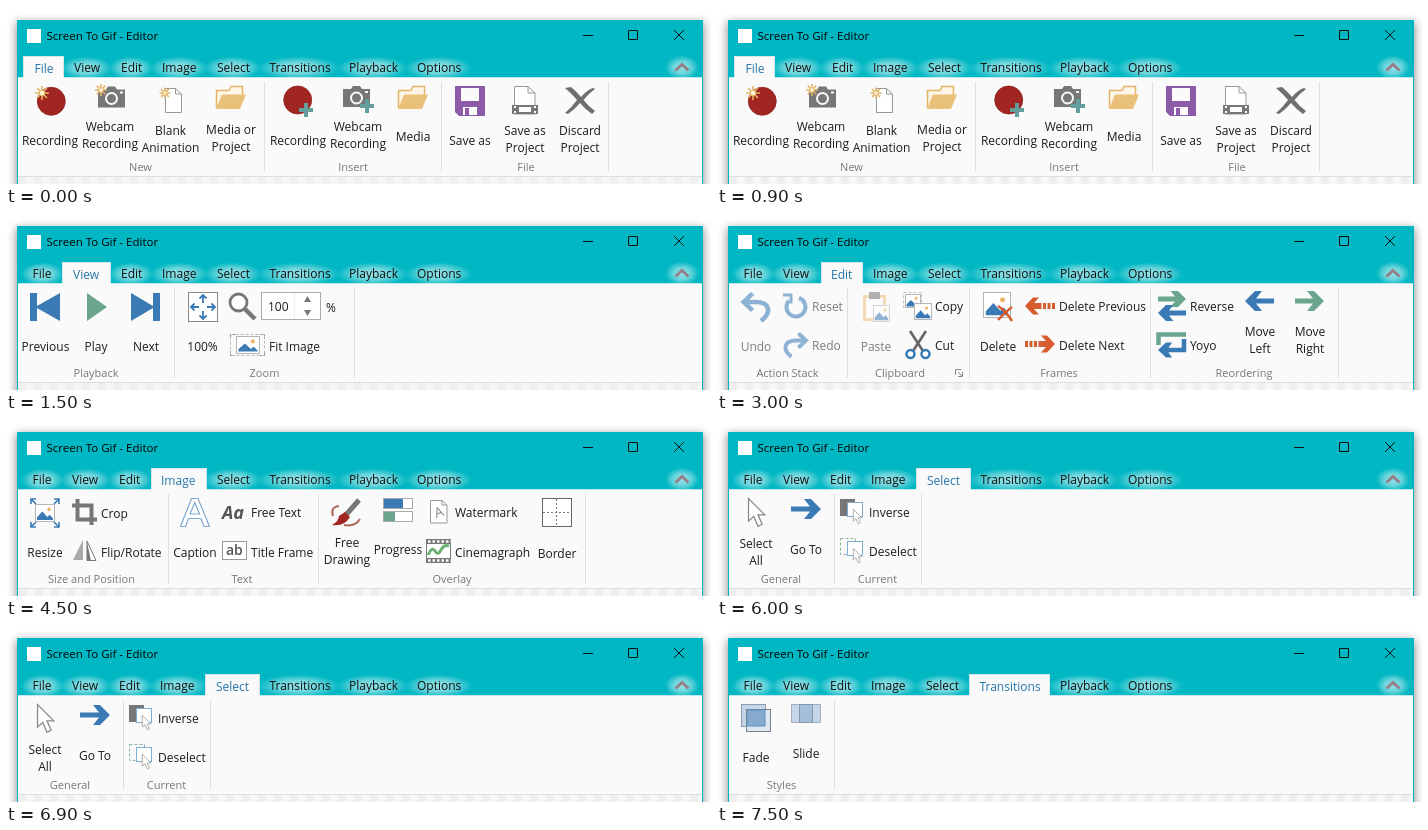
Recreate the animation shown at these times as an HTML page. Size 705 by 178 pixels, loop 8 s.

```html
<!DOCTYPE html>
<html lang="en">
<head>
<meta charset="utf-8">
<title>Ribbon tabs</title>
<style>
html, body { margin: 0; width: 100%; height: 100%; overflow: hidden; background: #fff; }
svg { display: block; width: 705px; height: 178px; font: 12px "Open Sans", sans-serif; }
text { white-space: pre; }
</style>
</head>
<body>
<svg id="stage" viewBox="0 0 705 178" xmlns="http://www.w3.org/2000/svg">
  <defs>
    <filter id="shade" x="-10%" y="-20%" width="120%" height="140%"><feGaussianBlur stdDeviation="5"/></filter>
    <radialGradient id="glow">
      <stop offset="0" stop-color="#fff" stop-opacity=".58"/>
      <stop offset=".5" stop-color="#fff" stop-opacity=".42"/>
      <stop offset="1" stop-color="#fff" stop-opacity="0"/>
    </radialGradient>
    <pattern id="check" x="12" y="171" width="16" height="16" patternUnits="userSpaceOnUse">
      <path d="M0 0h16v16H0z" fill="#f7f7f7"/>
      <path d="M0 0h8v8H0zM8 8h8v8H8z" fill="#efefef"/>
    </pattern>
  </defs>
  <rect x="10" y="16" width="688" height="190" fill="#000" opacity=".42" filter="url(#shade)"/>
  <path d="M11 14H697V178H11z" fill="#00b7c3"/>
  <path d="M12 71H696V178H12z" fill="#fafafa"/>
  <path d="M12 71.500H696" stroke="#c4e8eb"/>
  <path d="M12 170H696V178H12z" fill="url(#check)"/>
  <path d="M12 170.500H696" stroke="#dedede"/>
  <rect x="21" y="23" width="14" height="14" fill="#fff"/>
  <text x="40.500" y="34" font-size="11.500" fill="#000">Screen To Gif - Editor</text>
  <path d="M577 29.500h10M622.500 24.500h9v9h-9zM668 24l10 10M678 24l-10 10" fill="none" stroke="#111"/>
  <ellipse cx="676" cy="61.500" rx="17" ry="12" fill="url(#glow)"/>
  <path d="M669.500 64.500l6.500-6 6.500 6" fill="none" stroke="#967f88" stroke-width="2.800"/>
  <g id="tabs"></g>
  <g id="panel"></g>
</svg>
<script>
const BLUE = '#3a7ab5', GREEN = '#6ca58e', GRAY = '#777', RED = '#a12622',
      ORANGE = '#d65c2e', SAND = '#eac17b', PURPLE = '#8c5ba8', FADED = '#8db2d3';

const fill = (d, color) => `<path d="${d}" fill="${color}"/>`;
const line = (d, color, w = 1, inner = 'none', dash = 'none') =>
  `<path d="${d}" fill="${inner}" stroke="${color}" stroke-width="${w}" stroke-dasharray="${dash}"/>`;
const box = (x, y, w, h, inner, color = 'none') =>
  `<rect x="${x}" y="${y}" width="${w}" height="${h}" fill="${inner}" stroke="${color}"/>`;
const dot = (x, y, r, inner, color = 'none', w = 1) =>
  `<circle cx="${x}" cy="${y}" r="${r}" fill="${inner}" stroke="${color}" stroke-width="${w}"/>`;
const dashes = (x, y, w, h, color) => line(`M${x} ${y}h${w}v${h}h${-w}z`, color, 1, 'none', '3 2');
const at = (x, y, art, extra = '') => `<g transform="translate(${x} ${y}) ${extra}">${art}</g>`;
const fade = art => `<g opacity=".55">${art}</g>`;

// Labels are placed by the middle of their letters
const text = (x, y, s, attrs = '') => `<text x="${x}" y="${y + 5}" ${attrs}>${s}</text>`;
const center = 'text-anchor="middle"', dim = 'fill="#7d7d7d"';
const mid = (x, y, a, b) => b
  ? text(x, y - 1, a, center) + text(x, y + 16, b, center)
  : text(x, y, a, center);
const group = (x, s) => text(x, 160, s, center + ' font-size="11" fill="#777"');
const rules = (...xs) => xs.map(x => line(`M${x + .5} 76V166`, '#dfdfdf')).join('');

// Icon parts
const burst = (x, y, r) => {
  let d = '';
  for (let i = 0; i < 8; i++) {
    const a = i * Math.PI / 4, c = Math.cos(a), s = Math.sin(a);
    d += `M${x + c * r * .4} ${y + s * r * .4}L${x + c * r} ${y + s * r}`;
  }
  return line(d, '#e3b467', 1.6) + dot(x, y, r * .4, '#fff3d2', '#e3b467');
};
const plus = (x, y) => fill(`M${x - 2} ${y - 7}h4v5h5v4h-5v5h-4v-5h-5v-4h5z`, '#629f9c');
const record = (x, y) => dot(x, y, 14, RED, '#8c2422', .8);
const camera = (x, y) => at(x, y,
  fill('M0 3H8L10 0H17L19 3H27V21H0z', GRAY) + dot(13.5, 12, 5.5, GRAY, '#fafafa', 2) +
  box(22, 5, 3, 2, '#fafafa'));
const folder = (x, y) => at(x, y,
  line('M1.500 23V5.500H14L16 1.500H27.500V10', '#e2b568', 1.5, '#fdf6e8') + fill('M1 24L7 9.500H31L25 24z', SAND));
const page = (x, y, w, h, f = 6) => at(x, y,
  line(`M.5 .5H${w - f}L${w} ${f}V${h}H.5zM${w - f} .5V${f}H${w}`, '#999', 1, '#fff'));
const photo = (x, y, w, h) => {
  const m = w * .1, b = h - m;
  return at(x, y, box(.5, .5, w - 1, h - 1, '#fff', '#b5b5b5') +
    fill(`M${m} ${b}V${h * .74}L${w * .37} ${h * .42} ${w * .62} ${h * .72} ${w * .74} ${h * .6} ${w - m} ${h * .8}V${b}z`, BLUE) +
    dot(w * .7, h * .3, w * .09, '#efb66b'));
};
const arrow = (x, y, color, dir = 1, w = 29, h = 10) => at(x, y,
  fill(`M0-2.500H${w - 11}L${w - 9 - h * .8} ${-h}H${w - h}L${w} 0 ${w - h} ${h}H${w - 9 - h * .8}L${w - 11} 2.500H0z`, color),
  `scale(${dir} 1)`);
const cutArrow = (x, y, dir) => at(x, y,
  fill('M0-3h3v6H0zM4.500-3h3v6h-3zM9-3h3v6H9zM13.500-3H21L16-8.500H22L30 0 22 8.500H16L21 3H13.500z', ORANGE),
  `scale(${dir} 1)`);
const pointer = (x, y, s) => at(x, y,
  line('M.5 .5V22L5.500 17.500 9.500 27 13.500 25 9.500 16H16z', '#888', 1.2, '#fff'), `scale(${s})`);
const turn = (x, y, sx, sy) => at(x, y,
  line('M4 10H15C28 10 31 20 20 29', FADED, 4.5) + line('M12 1.500L3.500 10 12 18.500', FADED, 4.5),
  `scale(${sx} ${sy})`);

const panels = [
  () => record(45.3, 95.3) + burst(36, 87, 7) + camera(92, 80.5) + burst(95, 84, 6) +
    page(159, 82, 16.5, 24.5) + burst(159, 87, 5.5) + folder(209, 79) +
    mid(44, 134, 'Recording') + mid(104, 121, 'Webcam', 'Recording') +
    mid(164.5, 125, 'Blank', 'Animation') + mid(225, 124, 'Media or', 'Project') +
    record(291.7, 94) + plus(300, 104) + camera(337, 80) + plus(361, 100) + folder(391, 79) +
    mid(292, 134, 'Recording') + mid(352, 121, 'Webcam', 'Recording') + mid(407, 130, 'Media') +
    at(449, 80, fill('M0 0H30V30H4L0 26z', PURPLE) + box(6, 2, 18, 13, '#fafafa') +
      box(8, 21, 14, 8, '#fafafa') + box(10, 22, 4, 7, PURPLE)) +
    page(508, 80, 21, 28, 7) +
    at(506, 99, box(0, 0, 26, 9, GRAY) + box(7, 2, 12, 5, '#fff') +
      fill('M2 1h2v2H2zM2 6h2v2H2zM22 1h2v2h-2zM22 6h2v2h-2z', '#fff')) +
    fill('M559 82L565 81Q571 86 575 91 581 84 587 82L589 83Q582 88 577.500 94 583 101 589 105L586 108Q579 103 574 97 569 103 562 108L559 107Q566 101 571 94 566 88 559 82z', '#6f6f6f') +
    mid(464, 134, 'Save as') + mid(519, 125, 'Save as', 'Project') + mid(574, 125, 'Discard', 'Project') +
    group(134.5, 'New') + group(347, 'Insert') + group(520, 'File') + rules(258, 435, 602),

  () => fill('M24 81h7v13L54 81v28L31 96v13h-7z', BLUE) + fill('M81 81L101 95 81 109z', GREEN) +
    fill('M125 81L147 94V81h7v28h-7V96L125 109z', BLUE) +
    mid(39.5, 134, 'Previous') + mid(90, 134, 'Play') + mid(140, 134, 'Next') +
    box(182.5, 80.5, 29, 29, '#fff', '#888') +
    [0, 90, 180, 270].map(a => at(197, 95,
      line('M4 0H12M8.500-3.500L12 0 8.500 3.500', BLUE, 1.8), `rotate(${a})`)).join('') +
    mid(196.5, 134, '100%') +
    dot(232.5, 90.5, 8.5, '#fff', GRAY, 2.8) + line('M239 97L249 107', GRAY, 4.5) +
    box(255.5, 80.5, 59, 27, '#fff', '#ababab') + text(262, 94, '100') +
    line('M288.500 81V107', '#eee') +
    fill('M298 90L301.500 84 305 90zM298 98H305L301.500 104z', GRAY) + text(320, 95, '%') +
    line('M229 122.500H224.500V127M254 122.500H258.500V127M224.500 139V143.500H229M258.500 139V143.500H254', '#888') +
    dashes(224.5, 122.5, 34, 21, '#bbb') + photo(230, 124, 24, 18) + text(263, 134, 'Fit Image') +
    group(90, 'Playback') + group(258.5, 'Zoom') + rules(168, 348),

  () => turn(23, 80, 1.05, 1) + turn(92, 120, -.88, .85) +
    line('M82 86A9.500 9.500 0 1 1 72 88.500', FADED, 4) + line('M66 83H74V91.500', FADED, 3) +
    text(95, 94, 'Reset', dim) + text(95, 133, 'Redo', dim) +
    text(39, 134, 'Undo', center + ' ' + dim) +
    fade(line('M147.500 84.500h20v23h-20z', SAND, 3, '#fff') + box(152, 80, 11, 7, GRAY) +
      photo(156, 93, 17, 17)) + text(159, 134, 'Paste', center + ' ' + dim) +
    dashes(186.5, 80.5, 18, 15, '#c4c4c4') + photo(188, 82, 16, 14) + photo(197, 91, 18, 17) +
    line('M193 119L206 139M209 119L196 139', '#666', 2.6) +
    dot(193.5, 142, 4, '#fff', BLUE, 2.5) + dot(208.5, 142, 4, '#fff', BLUE, 2.5) +
    text(218, 94, 'Copy') + text(218, 133, 'Cut') +
    line('M238.500 163V157.500H244M241 160l4 4M245.500 160V164.500H241', '#888') +
    photo(266, 80, 28, 26) + line('M281 94Q289 99 295 109M295 95Q287 101 281 108', ORANGE, 2.5) +
    mid(281, 134, 'Delete') + cutArrow(338, 94, -1) + cutArrow(308, 132, 1) +
    text(342, 94, 'Delete Previous') + text(342, 133, 'Delete Next') +
    arrow(441, 87, GREEN, 1, 28, 8) + arrow(469, 101, BLUE, -1, 28, 8) +
    line('M441.500 133V122.500H469', GREEN, 4.5) +
    line('M467 127V138H450', BLUE, 4.5) + fill('M441 138L449 130.500H455L450 138 455 145.500H449z', BLUE) +
    text(473, 94, 'Reverse') + text(473, 133, 'Yoyo') +
    arrow(557, 89, BLUE, -1) + arrow(578, 89, GREEN) +
    mid(543, 120, 'Move', 'Left') + mid(593, 120, 'Move', 'Right') +
    group(70.5, 'Action Stack') + group(183, 'Clipboard') + group(342, 'Frames') +
    group(527, 'Reordering') + rules(130, 252, 433, 621),

  () => photo(29, 86, 20, 18) +
    [[1, 1], [-1, 1], [1, -1], [-1, -1]].map(([a, b]) => at(39, 95,
      line('M9 9L14 14M14 9V14H9', BLUE, 1.6), `scale(${a} ${b})`)).join('') +
    line('M71.500 81V101.500H91M66 87.500H85.500V107', GRAY, 4) +
    at(67, 122, fill('M0 20L10 0V20z', '#aaa') + line('M14 20.500V1L23 20.500z', '#777', 1, '#fff') +
      fill('M14 21V2L18 21z', GRAY)) +
    mid(39, 134, 'Resize') + text(95, 95, 'Crop') + text(95, 134, 'Flip/Rotate') +
    line('M174.500 108.500L185.500 80.500H192L203.500 108.500H198L195 100.500H182.500L179.500 108.500zM184 96H193.500L188.800 84.500z', '#7fa9cf', 1.2, '#fff') +
    text(216, 96, 'Aa', 'font-size="18" font-weight="700" font-style="italic" fill="#555"') +
    box(216.5, 123.5, 24, 18, '#fff', '#999') +
    text(220, 131.5, 'ab', 'font-size="14" font-weight="600" fill="#555"') +
    mid(189, 134, 'Caption') + text(245, 94, 'Free Text') + text(245, 134, 'Title Frame') +
    line('M353 82L339 98', GRAY, 5) + fill('M339 94L344 99Q338 109 326 107 333 103 333 98z', RED) +
    line('M327 98Q324 89 333 88M338 107Q349 109 354 101', '#b0655e', 2) +
    box(377.5, 80.5, 29, 10, '#fff', '#aaa') + box(378, 81, 19, 9, BLUE) +
    box(377.5, 93.5, 29, 10, '#fff', '#aaa') + box(378, 94, 11, 9, GREEN) +
    page(424, 82, 17, 23, 5) +
    at(433, 95, text(0, -1, 'A', center + ' font-size="14" fill="#888"'), 'rotate(-20)') +
    box(420, 121, 25, 24, GRAY) + box(421, 126, 23, 14, '#fff') +
    line('M422 123.500H445M422 142.500H445', '#fff', 2.5, 'none', '2.5 2') +
    line('M422 137Q426 128 429 133T435 132 443 128', '#6bb071', 3) +
    box(536.5, 80.5, 29, 28, '#fff', '#666') +
    line('M550.500 81V108M537 94.500H565', '#777', 1, 'none', '2 2') +
    mid(341, 125, 'Free', 'Drawing') + mid(392, 131, 'Progress') +
    text(449, 94, 'Watermark') + text(449, 134, 'Cinemagraph') + mid(551, 135, 'Border') +
    group(85.5, 'Size and Position') + group(236, 'Text') + group(446, 'Overlay') + rules(162, 312, 579),

  () => pointer(31, 80, 1.05) + arrow(74, 91, BLUE, 1, 30) +
    mid(39, 126, 'Select', 'All') + mid(89, 131, 'Go To') +
    box(123, 81, 15, 17, GRAY) + box(130.5, 84.5, 15, 14, '#fff', '#7fa9cf') + pointer(136, 91, .55) +
    dashes(123.5, 120.5, 15, 16, '#8bb2a4') + box(130.5, 123.5, 15, 14, '#fff', '#7fb0cf') + pointer(136, 130, .55) +
    text(152, 94, 'Inverse') + text(152, 133, 'Deselect') +
    group(64, 'General') + group(160.5, 'Current') + rules(117, 204),

  () => box(24.5, 80.5, 24, 22, '#c3d5e7', '#8c9bab') + box(29.5, 85.5, 24, 22, '#dce7f2', '#77818b') +
    box(30, 86, 18, 16, '#86aacd', '#5f8fbe') +
    box(74.5, 80.5, 29, 18, '#c5d6e8', '#a3afbb') + box(82.5, 80.5, 13, 18, '#a4bfda', '#8798a9') +
    mid(39, 133, 'Fade') + mid(89, 129, 'Slide') + group(64.5, 'Styles') + rules(117)
];

// Name, text start, left and right edge
const tabs = [
  ['File', 28.5, 17, 58], ['View', 68, 56, 105], ['Edit', 115, 104, 146], ['Image', 156, 145, 201],
  ['Select', 211, 199, 254], ['Transitions', 263.5, 252, 333], ['Playback', 343, 332, 401], ['Options', 411, 400, 465]
];

const drawTabs = on => tabs.map(([name, x, left, right], i) => {
  if (i === on) return fill(`M${left} 50H${right}V72H${left}z`, '#fafafa') +
    line(`M${left + .5} 71V50.500H${right - .5}V71`, '#d5e6e8') +
    text(x - (i ? 1 : 0), 62, name, 'fill="#2474a8"');
  const shift = i < on ? 2 : 0;
  return `<ellipse cx="${(left + right - shift) / 2}" cy="62" rx="${(right - left) / 2 + 1}" ry="11.5" fill="url(#glow)"/>` +
    text(x - shift, 61, name, 'fill="#111"');
}).join('');

const LOOP = 8000, STEP = 1500;
const tabLayer = document.getElementById('tabs'), panel = document.getElementById('panel');
let shown = -1;

function render(ms) {
  const on = Math.floor(ms % LOOP / STEP);
  if (on === shown) return;
  shown = on;
  tabLayer.innerHTML = drawTabs(on);
  panel.innerHTML = `<g fill="#1c1c1c">${panels[on]()}</g>`;
}

const start = performance.now();
function tick() {
  render(performance.now() - start);
  requestAnimationFrame(tick);
}
tick();
</script>
</body>
</html>
```
